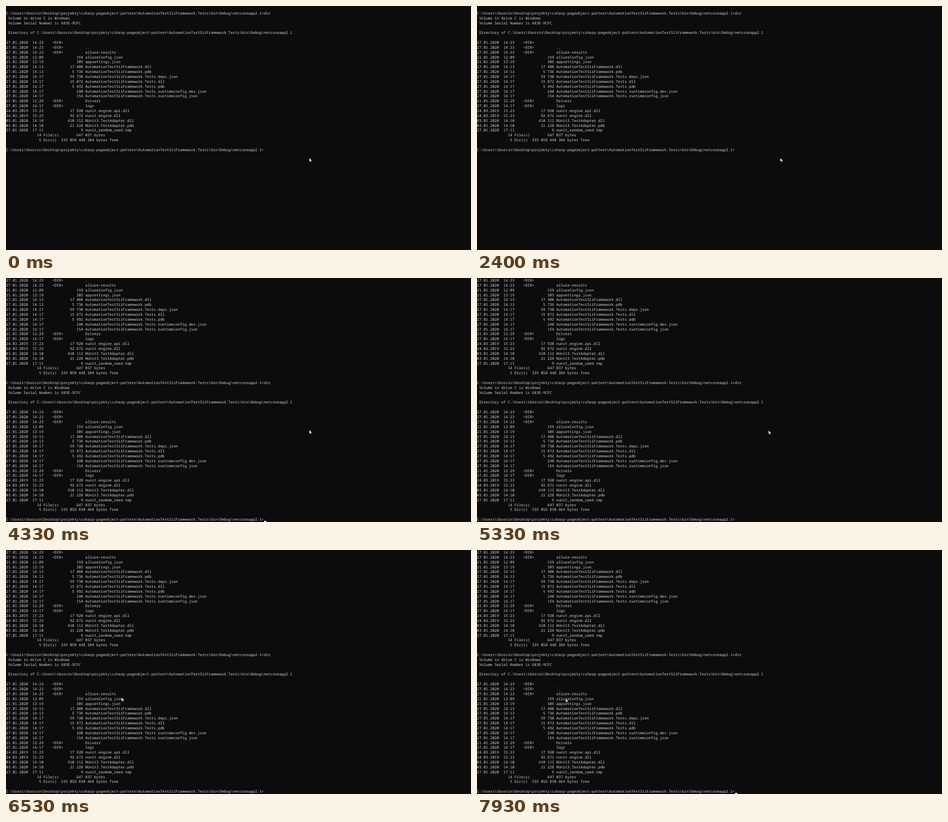
Animation of 1031 by 543 pixels, one loop 8 s. Source, as an HTML page:

```html
<!DOCTYPE html>
<html lang="en">
<head>
<meta charset="utf-8">
<title>Console</title>
<style>
html, body { margin: 0; width: 100%; height: 100%; overflow: hidden; background: #0c0c0c; }
pre {
  position: absolute; left: 0; top: 1px; margin: 0; color: #d6d6d6;
  font: 500 8.157px/10.86px "Noto Sans Mono", monospace;
  font-variant-ligatures: none; text-rendering: geometricPrecision;
}
svg { position: absolute; left: 0; top: 0; }
</style>
</head>
<body>
<pre id="screen"></pre>
<svg width="1031" height="543">
  <rect id="caret" width="4.89" height="2.4" fill="#fff"/>
  <path id="mouse" d="M0 0V16.5L3.8 12.9 6.3 18.5 8.7 17.5 6.3 12H11.5Z" fill="#fff" stroke="#000"/>
</svg>
<script>
const COL = 4.89, ROW = 10.86, LOOP = 8000;
// Times in ticks, 15 per second
const TYPE = 57, ENTER = 65, BLINK = 8;

const dir = String.raw`C:\Users\tborvin\Desktop\projekty\csharp-pageobject-pattern\AutomationTestSiiFramework.Tests\bin\Debug\netcoreapp2.1`;
const prompt = dir + ">";
const app = "AutomationTestSiiFramework";

// date|time|size (empty for a directory)|name
const files = `27.01.2020|14:23||.
27.01.2020|14:23||..
27.01.2020|14:23||allure-results
21.01.2020|12:09|159|allureConfig.json
21.01.2020|13:19|305|appsettings.json
27.01.2020|14:13|17 408|${app}.dll
27.01.2020|14:13|5 736|${app}.pdb
27.01.2020|14:17|59 730|${app}.Tests.deps.json
27.01.2020|14:17|15 872|${app}.Tests.dll
27.01.2020|14:17|5 492|${app}.Tests.pdb
27.01.2020|14:17|240|${app}.Tests.runtimeconfig.dev.json
27.01.2020|14:17|154|${app}.Tests.runtimeconfig.json
21.01.2020|12:29||Drivers
27.01.2020|14:17||logs
24.03.2019|15:23|17 920|nunit.engine.api.dll
24.03.2019|15:23|92 672|nunit.engine.dll
03.01.2020|14:10|410 112|NUnit3.TestAdapter.dll
03.01.2020|14:10|21 228|NUnit3.TestAdapter.pdb
27.01.2020|17:11|9|nunit_random_seed.tmp`.split("\n").map(line => {
  const [date, time, size, name] = line.split("|");
  const kind = size ? size.padStart(18) : "    <DIR>".padEnd(18);
  return `${date}  ${time}${kind} ${name}`;
});

const listing = free => [
  prompt + "dir",
  " Volume in drive C is Windows",
  " Volume Serial Number is 683E-9CFC",
  "",
  " Directory of " + dir,
  "",
  ...files,
  "14".padStart(16) + " File(s)" + "647 037".padStart(15) + " bytes",
  "5".padStart(16) + ` Dir(s)  ${free} bytes free`,
  ""
];
const first = ["", ...listing("335 058 448 384")];
const scrolled = [...first, ...listing("335 056 830 464"), prompt].slice(8);

// Turning points of the mouse: [tick, position]
const turnsX = [[79, 672.5], [86.3, 100], [98, 256], [105, 170], [111, 250], [117, 153], [121, 240]];
const turnsY = [[79, 338], [85, 353], [92, 319], [98, 328], [102, 309], [108, 328], [115, 304], [121, 339]];

// Swings from one turning point to the next along half a cosine
function swing(turns, tick) {
  const i = turns.findIndex(([t]) => t >= tick);
  if (i < 1) return turns[0][1];
  const [[t0, a], [t1, b]] = [turns[i - 1], turns[i]];
  return a + (b - a) * (1 - Math.cos(Math.PI * (tick - t0) / (t1 - t0))) / 2;
}

function caretOn(tick) {
  const since = tick < ENTER ? tick - 12 : Math.max(0, tick - 68);
  return since >= 0 && Math.floor(since / BLINK) % 2 === 0;
}

const [screenEl, caret, mouse] = ["screen", "caret", "mouse"].map(id => document.getElementById(id));
let shown = "";

function draw(now) {
  const tick = Math.floor((now % LOOP + 4) * 0.015);
  const typed = tick < ENTER ? "dir".slice(0, Math.max(0, Math.ceil((tick - TYPE + 1) / 1.5))) : "";
  const lines = tick < ENTER ? [...first, prompt + typed] : scrolled;
  const text = lines.join("\n");
  if (text !== shown) screenEl.textContent = shown = text;

  caret.setAttribute("x", (prompt.length + typed.length) * COL);
  caret.setAttribute("y", lines.length * ROW - 2.4);
  caret.style.display = typed || caretOn(tick) ? "" : "none";
  mouse.setAttribute("transform", `translate(${swing(turnsX, tick)} ${swing(turnsY, tick)}) scale(.543)`);
  requestAnimationFrame(draw);
}
requestAnimationFrame(draw);
</script>
</body>
</html>
```
